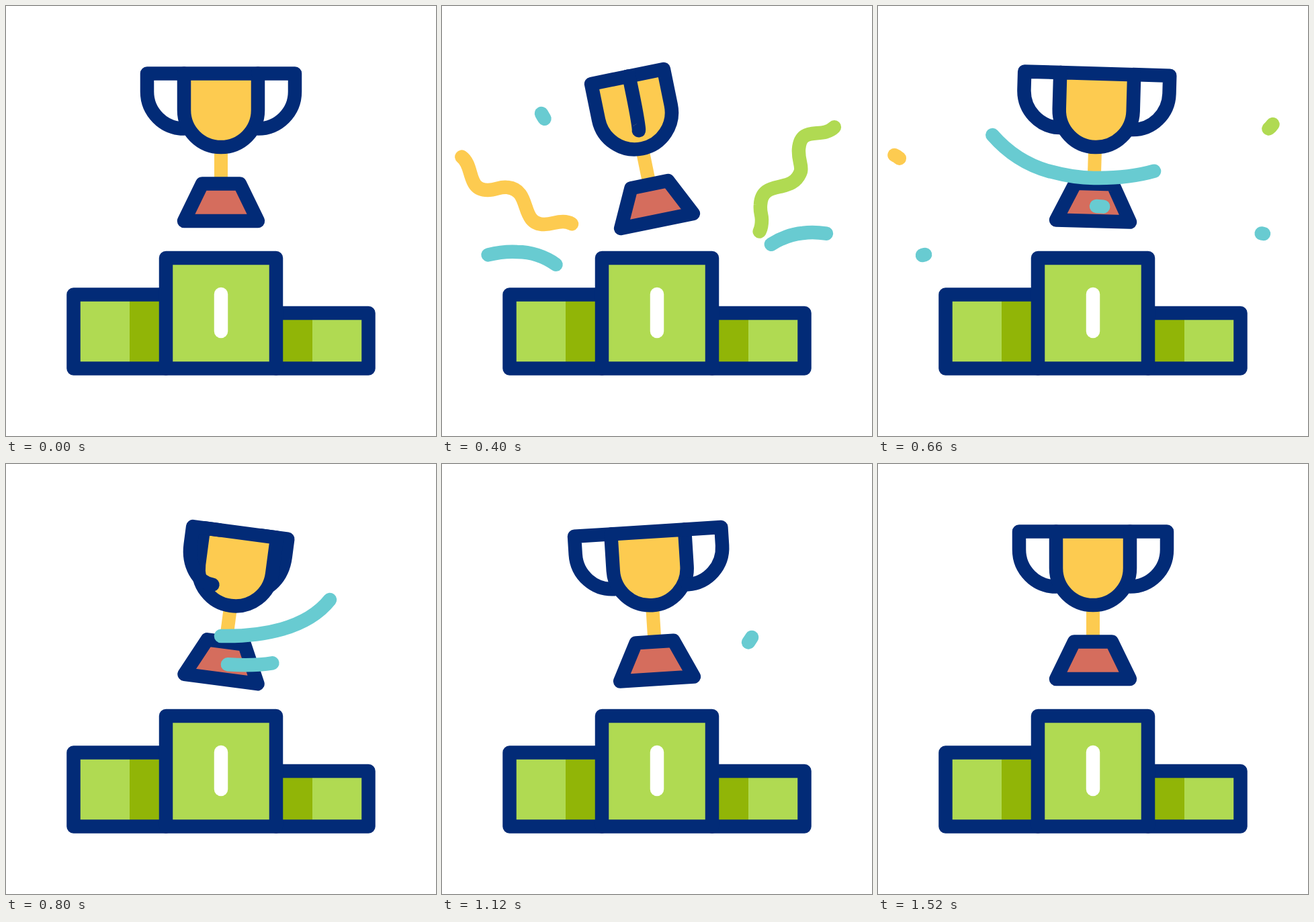
Write an HTML page that moves like this. It is 640 px wide and 640 px high and loops after 2400 ms.

```html
<!DOCTYPE html>
<html lang="en">
<head>
<meta charset="utf-8">
<title>Winner's podium</title>
<style>
  html, body { margin: 0; height: 100%; overflow: hidden; background: #fff; }
  svg { display: block; width: 100%; height: 100%; }
  .line { stroke: #022b77; }
  .lime { fill: #b0da52; }
  .dark { fill: #91b507; }
</style>
</head>
<body>
<svg viewBox="0 0 640 640" fill="none" stroke-width="20.5" stroke-linecap="round" stroke-linejoin="round">
  <path class="lime" d="M100 429H238V539H100ZM402 457H540V539H402Z"/>
  <path class="dark" d="M184 429H238V539H184ZM402 457H456V539H402Z"/>
  <path class="line" d="M238 429.5H100.5V539.5H238M402 457H539.5V539.5H402"/>
  <path class="line lime" d="M238 375H402V539.5H238Z"/>
  <path stroke="#fff" d="M320 429V484"/>
  <g id="trophy">
    <path id="back" class="line"/>
    <path fill="#fdcb50" d="M310 212H330V264H310Z"/>
    <path class="line" fill="#d56d5d" d="M292 264.5H348L375 320H265Z"/>
    <path class="line" fill="#fdcb50" d="M265 100.5H375V155A55 55 0 0 1 265 155Z"/>
    <path id="front" class="line"/>
  </g>
  <g id="ribbons"></g>
</svg>
<script>
const LOOP = 2400, TRAVEL = 440;
const YELLOW = '#fdcb50', LIME = '#b0da52', TEAL = '#68cbd1';
const $ = id => document.getElementById(id);
const ease = p => (1 - Math.cos(Math.PI * Math.min(1, Math.max(0, p)))) / 2;

// [time, value] keys, eased between neighbours
const SWING = [[0, 0], [355, -12], [850, 8], [1120, -3.6], [1300, 2], [1520, 0]];
const TWIST = [[0, 0], [355, 92], [830, -51], [1120, 6], [1300, 0]];

// colour, time the head leaves, time the tail leaves, path
const ribbons = [
  [YELLOW, 0, 270, 'M224 372C204 364 212 321 180 321C168 321 165 325 152 325C115 325 134 274 98 270C86 268 82 274 68 274C34 274 50 232 24.5 222'],
  [LIME, 0, 270, 'M421 361C440 340 476 360 476 318C476 310 473 308 474 296C476 256 522 282 534 246C536 236 530 230 531 213C534 174 570 202 587.5 176'],
  [TEAL, 0, 270, 'M189 404C172 380 140 366 112 366C96 365 82 367 66 371'],
  [TEAL, 0, 270, 'M472 368C490 352 514 340 537 338C550 336 562 337 574 339'],
  [TEAL, 358, 570, 'M148 160C170 200 208 233 255 246C277 252 300 256 321 256C380 257 447 246 482 202'],
  [TEAL, 587, 750, 'M325 298C382 302 438 298 461 258']
].map(([stroke, head, tail, d]) => {
  const el = document.createElementNS('http://www.w3.org/2000/svg', 'path');
  for (const [k, v] of Object.entries({ stroke, d, pathLength: 1 })) el.setAttribute(k, v);
  $('ribbons').append(el);
  return { el, head, tail };
});

function valueAt(keys, t) {
  const i = keys.findIndex(k => k[0] > t);
  if (i < 0) return keys[keys.length - 1][1];
  const [t0, a] = keys[i - 1], [t1, b] = keys[i];
  return a + (b - a) * ease((t - t0) / (t1 - t0));
}

// One handle, turned about the upright axis of the cup
function handle(side, turn) {
  const c = Math.cos(turn) * side;
  const outer = 320 + 110 * c;
  const inner = 320 + 55 * Math.sign(c) * Math.abs(c) ** 1.33;
  const bend = outer + (inner - outer) * 0.448;
  return `M${inner} 100.5H${outer}V127.5C${outer} 157.9 ${bend} 182.5 ${inner} 182.5`;
}

function draw(t) {
  const turn = valueAt(TWIST, t) * Math.PI / 180;
  const near = turn < 0 ? -1 : 1;
  $('trophy').setAttribute('transform', `rotate(${valueAt(SWING, t)} 320 320)`);
  $('back').setAttribute('d', handle(-near, turn));
  $('front').setAttribute('d', handle(near, turn));
  for (const { el, head, tail } of ribbons) {
    const end = ease((t - head) / TRAVEL), start = ease((t - tail) / TRAVEL);
    el.style.display = end - start > 0.001 ? '' : 'none';
    el.style.strokeDasharray = `${end - start} 2`;
    el.style.strokeDashoffset = -start;
  }
}

const begin = performance.now();
function tick() {
  draw((performance.now() - begin) % LOOP);
  requestAnimationFrame(tick);
}
tick();
</script>
</body>
</html>
```
